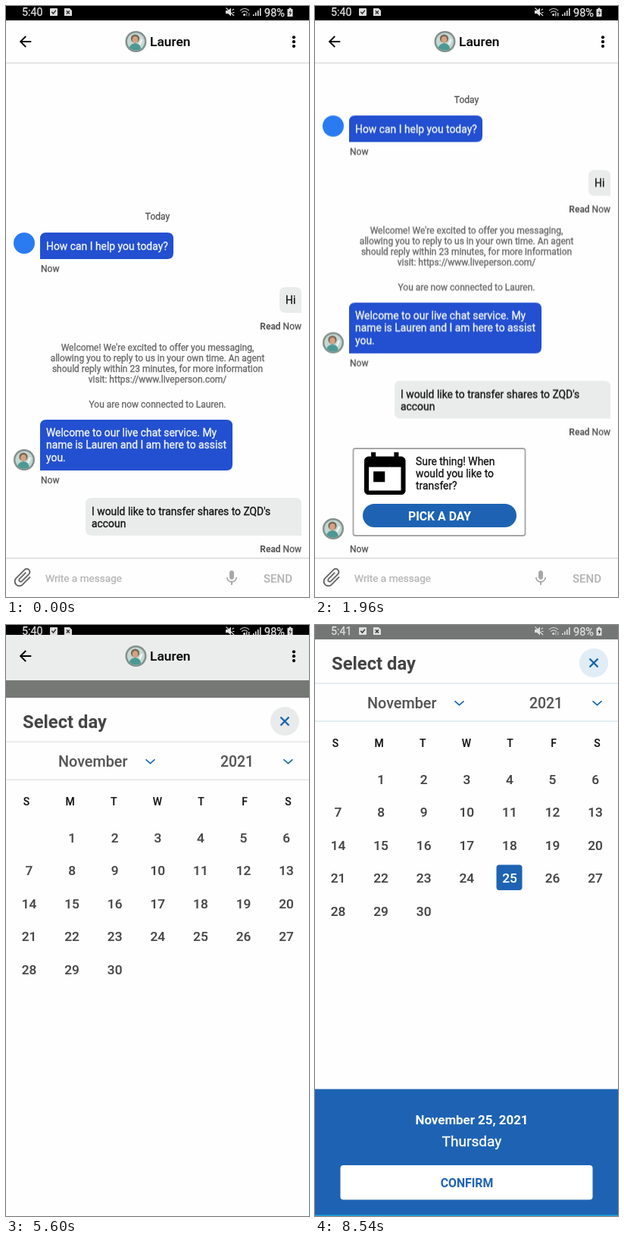
Animation of 400 by 780 pixels, one loop 9240 ms. Source, as an HTML page:

```html
<!DOCTYPE html>
<html lang="en">
<head>
<meta charset="utf-8">
<title>Chat and day picker</title>
<style>
html, body { margin: 0; width: 100%; height: 100%; overflow: hidden; background: #fff; }
svg { display: block; width: 400px; height: 780px; }
text { font-family: Roboto, sans-serif; font-size: 12px; fill: currentColor; stroke: currentColor; stroke-width: .3px; white-space: pre; }
.msg text { font-size: 13.9px; }
.mid { text-anchor: middle; }
.end { text-anchor: end; }
.b { font-weight: 700; stroke-width: 0; }
.m { font-weight: 500; stroke-width: .1px; }
.note { color: #666; }
.small { color: #555; }
.line { fill: none; stroke: #1565b0; stroke-width: 1.6; }

.a { animation: 9240ms linear infinite; }
.step { animation-timing-function: step-end; }
.cursor { animation-name: blink; }
.today { animation-name: today; }
.list { animation-name: list; }
.card { animation-name: card; }
.dim { animation-name: dim; }
.head { animation-name: head; }
.lift { animation-name: lift; }
.top { animation-name: top; }
.sheet { animation-name: sheet; }
.cool { animation-name: cool; }
.old { animation-name: old; }
.new { animation-name: new; }
.picked { animation-name: picked; }
.net { animation-name: net; }

@keyframes blink {
  0%, 6.05%, 18.93%, 29.53%, 40.9%, 52.26% { opacity: 0; }
  .75%, 12.87%, 24.23%, 35.59%, 46.2%, 58.32%, 100% { opacity: 1; }
}
@keyframes today {
  0% { transform: none; }
  15.52%, 100% { transform: translateY(-154px); }
}
@keyframes list {
  0%, 15.52% { transform: translateY(0); animation-timing-function: cubic-bezier(.37, 0, .63, 1); }
  18.4%, 100% { transform: translateY(-154.5px); }
}
@keyframes card { 0%, 18.4% { opacity: 0; } 19.91%, 100% { opacity: 1; } }
@keyframes dim { 0%, 58.33% { opacity: 0; } 60.6%, 100% { opacity: 1; } }
@keyframes head { 0% { opacity: 1; } 61.04%, 100% { opacity: 0; } }
@keyframes lift { 0%, 58.33% { transform: translateY(0); } 60.6%, 100% { transform: translateY(-6px); } }
@keyframes top { 0% { fill: #000; } 61.04%, 100% { fill: #737674; } }
@keyframes sheet {
  0%, 58.345% { transform: translateY(761px); animation-timing-function: cubic-bezier(.333, 1, .667, 1); }
  62.6%, 100% { transform: translateY(0); }
}
@keyframes cool { 0% { opacity: 0; } 62.1%, 100% { opacity: 1; } }
@keyframes old { 0% { opacity: 1; } 67.4%, 100% { opacity: 0; } }
@keyframes new { 0% { opacity: 0; } 67.4%, 100% { opacity: 1; } }
@keyframes picked { 0% { opacity: 0; } 80.29%, 100% { opacity: 1; } }
@keyframes net { 0%, 92.4% { opacity: .5; } 11.35%, 100% { opacity: .85; } }
</style>
</head>
<body>
<svg viewBox="0 0 400 780">
  <defs>
    <clipPath id="disc"><circle r="11.5"/></clipPath>
    <g id="avatar">
      <circle r="14" fill="#84908d"/>
      <circle r="11.5" fill="#c3d8d3"/>
      <g clip-path="url(#disc)">
        <path d="M-10 12Q-9 3 -1 2Q7 3 7 12Z" fill="#4c9993"/>
        <circle cx="-1" cy="-4" r="5.6" fill="#7b6655"/>
        <ellipse cx="-1" cy="-2.5" rx="3.7" ry="4.6" fill="#d5a283"/>
        <path d="M5 4L8 -3" stroke="#f4f6f5" stroke-width="2.4"/>
      </g>
    </g>
    <path id="chevron" d="M-6 -2.6L0 2.6L6 -2.6"/>
  </defs>

  <rect width="400" height="780" fill="#fefefe"/>

  <!-- conversation -->
  <text class="a step today mid small" x="200" y="281.5">Today</text>
  <g class="a list">
    <circle cx="24" cy="313" r="14" fill="#2a7bf2"/>
    <g fill="#2350d0">
      <path d="M53 299H213Q221 299 221 307V326Q221 334 213 334H45V307Q45 299 53 299Z"/>
      <path d="M53 546H291Q299 546 299 554V605Q299 613 291 613H45V554Q45 546 53 546Z"/>
    </g>
    <g fill="#eaecec">
      <path d="M369 371H382Q390 371 390 379V405H369Q361 405 361 397V379Q361 371 369 371Z"/>
      <path d="M113 649H382Q390 649 390 657V699H113Q105 699 105 691V657Q105 649 113 649Z"/>
    </g>
    <g class="msg" color="#f4f7ff">
      <text x="53" y="321.5">How can I help you today?</text>
      <text x="53" y="568">Welcome to our live chat service. My</text>
      <text x="53" y="584.3">name is Lauren and I am here to assist</text>
      <text x="53" y="600.6">you.</text>
    </g>
    <g class="msg" color="#111">
      <text x="369" y="392.5">Hi</text>
      <text x="113" y="671.5">I would like to transfer shares to ZQD's</text>
      <text x="113" y="687.8">accoun</text>
    </g>
    <g class="small">
      <text x="46" y="350.5">Now</text>
      <text x="46" y="629.5">Now</text>
      <text class="end" x="390" y="426.5"><tspan class="b">Read</tspan> Now</text>
      <text class="end" x="390" y="721.3"><tspan class="b">Read</tspan> Now</text>
    </g>
    <g class="note mid">
      <text x="200" y="454.8">Welcome! We're excited to offer you messaging,</text>
      <text x="200" y="469">allowing you to reply to us in your own time. An agent</text>
      <text x="200" y="483.2">should reply within 23 minutes, for more information</text>
      <text x="200" y="497.4">visit: https://www.liveperson.com/</text>
      <text x="200" y="529.8">You are now connected to Lauren.</text>
    </g>
    <use href="#avatar" x="24" y="599"/>
  </g>

  <g class="a card">
    <rect x="50.5" y="584" width="227" height="115" rx="3" fill="#fff" stroke="#a6a6a6" stroke-width="1.8"/>
    <path transform="translate(55.9 586.2) scale(3.03 2.8)" d="M19 3h-1V1h-2v2H8V1H6v2H5c-1.11 0-1.99.9-1.99 2L3 19c0 1.1.89 2 2 2h14c1.1 0 2-.9 2-2V5c0-1.1-.9-2-2-2zm0 16H5V8h14v11zM7 10h5v5H7z"/>
    <g class="msg" color="#111">
      <text x="133" y="606">Sure thing! When</text>
      <text x="133" y="622">would you like to</text>
      <text x="133" y="638">transfer?</text>
    </g>
    <rect x="63" y="657" width="203" height="31" rx="15.5" fill="#1e63b3"/>
    <text class="mid b" x="164.5" y="678.5" style="font-size:15.8px" color="#fff">PICK A DAY</text>
    <use href="#avatar" x="24" y="690"/>
    <text class="small" x="46" y="721.3">Now</text>
  </g>

  <!-- message bar -->
  <rect y="728" width="400" height="52" fill="#fefefe"/>
  <rect y="728" width="400" height="1.6" fill="#dcdcdc"/>
  <path transform="translate(22.5 754.5) rotate(45) scale(1.25) translate(-12.5 -12)" fill="#666" d="M16.5 6v11.5c0 2.21-1.79 4-4 4s-4-1.79-4-4V5c0-1.38 1.12-2.5 2.5-2.5s2.5 1.12 2.5 2.5v10.5c0 .55-.45 1-1 1s-1-.45-1-1V6H10v9.5c0 1.38 1.12 2.5 2.5 2.5s2.5-1.12 2.5-2.5V5c0-2.21-1.79-4-4-4S7 2.79 7 5v12.5c0 3.04 2.46 5.5 5.5 5.5s5.5-2.46 5.5-5.5V6h-1.5z"/>
  <g color="#b4b4b4">
    <text x="52" y="759.8" style="font-size:13.6px">Write a message</text>
    <text class="m" x="340" y="761.2" style="font-size:15px">SEND</text>
  </g>
  <path transform="translate(286 743)" fill="#a8a8a8" d="M12 14c1.66 0 2.99-1.34 2.99-3L15 5c0-1.66-1.34-3-3-3S9 3.34 9 5v6c0 1.66 1.34 3 3 3zm5.3-3c0 3-2.54 5.1-5.3 5.1S6.7 14 6.7 11H5c0 3.41 2.72 6.23 6 6.72V21h2v-3.28c3.28-.48 6-3.3 6-6.72h-1.7z"/>
  <rect class="a step cursor" x="51.5" y="745" width="2.5" height="20" fill="#2a9fc0"/>

  <rect class="a dim" y="73" width="400" height="707" fill="#000500" fill-opacity=".54"/>

  <!-- status bar -->
  <rect class="a step top" width="400" height="97" fill="#000"/>
  <g color="#dedede" fill="#dedede">
    <text class="a step old" x="21" y="13.4" style="font-size:14.2px">5:40</text>
    <text class="a step new" x="21" y="13.4" style="font-size:14.2px">5:41</text>
    <text x="341" y="13.6" style="font-size:14.5px">98%</text>
    <rect x="58" y="3" width="10" height="10" rx="1"/>
    <path d="M60.3 7.8L62.4 10L66 5.6" fill="none" stroke="#333" stroke-width="1.5"/>
    <path d="M77 3h7l3 3v7H77Z"/>
    <path d="M79.8 6.2L84 10.6M84 6.2L79.8 10.6" stroke="#333" stroke-width="1.4"/>
    <path d="M290 6h3l4 -3.5v11L293 10h-3Z"/>
    <path d="M290.5 2.5L301 13M298.5 5.5L301 4M299 8.5h2.5" stroke="#dedede" stroke-width="1.1"/>
    <path d="M309 6Q315 .8 321 6M311 8.6Q315 5 319 8.6" fill="none" stroke="#dedede" stroke-width="1.2" opacity=".8"/>
    <circle cx="314.6" cy="11.6" r="1.5"/>
    <path class="a step net" d="M317 13.5V9h1.5v4.5ZM320 13.5V9h1.5v4.5Z"/>
    <path d="M326 13v-2h1.6v2ZM329 13V8.5h1.6V13ZM332 13V6h1.6v7ZM335 13V3h1.6v10Z"/>
    <path d="M371.5 4h2V2.5h3V4h2v10h-7Z"/>
    <path d="M376 5l-2.6 4.2h1.8L374.3 13l2.9 -4.7h-1.9Z" fill="#222"/>
  </g>

  <!-- title bar -->
  <g class="a step head">
    <rect y="19" width="400" height="78" fill="#fefefe"/>
    <rect class="a dim" y="73" width="400" height="24" fill="#757875"/>
    <g class="a lift">
      <rect y="19" width="400" height="57" fill="#fefefe"/>
      <rect y="74.5" width="400" height="1.5" fill="#dedede"/>
      <rect class="a dim" y="19" width="400" height="60" fill="#ebedec"/>
      <path transform="translate(13.9 35.4) scale(.97)" d="M20 11H7.83l5.59-5.59L12 4l-8 8 8 8 1.41-1.41L7.83 13H20v-2z"/>
      <use href="#avatar" x="171.5" y="47"/>
      <text class="m" x="190" y="53.3" style="font-size:17.4px" color="#000">Lauren</text>
      <circle cx="380" cy="41.3" r="2.1"/>
      <circle cx="380" cy="47.2" r="2.1"/>
      <circle cx="380" cy="53.1" r="2.1"/>
    </g>
  </g>

  <!-- day picker -->
  <g class="a sheet">
    <rect y="19" width="400" height="761" fill="#fefefe"/>
    <g fill="#e4e6e6">
      <rect y="76.5" width="400" height="1.5"/><rect y="126.5" width="400" height="1.5"/>
      <circle cx="368" cy="50" r="19" fill="#e9ebeb"/>
    </g>
    <g class="a step cool" fill="#dfecf3">
      <rect y="76.5" width="400" height="1.5"/><rect y="126.5" width="400" height="1.5"/>
      <circle cx="368" cy="50" r="19" fill="#e1edf6"/>
    </g>
    <path class="line" d="M362.5 44.5L373.5 55.5M373.5 44.5L362.5 55.5" style="stroke-width:2.4"/>
    <text class="b" x="22" y="59.2" style="font-size:23.8px" color="#444">Select day</text>
    <g color="#555">
      <text class="m" x="69" y="110" style="font-size:19.8px">November</text>
      <text class="m" x="283" y="110" style="font-size:19.4px">2021</text>
    </g>
    <g class="line"><use href="#chevron" x="190.5" y="103"/><use href="#chevron" x="372.5" y="103"/></g>
    <g id="week" class="mid" color="#111"></g>
    <g id="days" class="mid" color="#444"></g>
  </g>

  <!-- chosen day -->
  <g class="a step picked">
    <rect x="239.5" y="316.5" width="34" height="33.5" rx="4" fill="#1e63b3"/>
    <rect y="612.5" width="400" height="167.5" fill="#1e63b3"/>
    <rect y="778.5" width="400" height="1.5" fill="#1ca5d8"/>
    <rect x="33.5" y="713" width="333" height="45.5" rx="4" fill="#fff"/>
    <g class="mid" color="#fff">
      <text class="m" x="257" y="340.1" style="font-size:17.3px">25</text>
      <text class="b" x="207" y="659.4" style="font-size:16.9px">November 25, 2021</text>
      <text x="207" y="688" style="font-size:19.1px">Thursday</text>
      <text class="b" x="200.5" y="741.6" style="font-size:15.8px" color="#1e63b3">CONFIRM</text>
    </g>
  </g>
</svg>
<script>
const label = (id, x, y, size, str) => {
  const el = document.createElementNS('http://www.w3.org/2000/svg', 'text');
  el.setAttribute('x', x);
  el.setAttribute('y', y);
  el.setAttribute('class', 'm');
  el.style.fontSize = size + 'px';
  el.textContent = str;
  document.getElementById(id).append(el);
};
[...'SMTWTFS'].forEach((c, i) => label('week', 27 + i * 57.6, 161, 14, c));
for (let d = 1; d <= 30; d++)
  label('days', 30.5 + d % 7 * 56.6, 209.7 + Math.floor(d / 7) * 43.45, 17.3, d);
</script>
</body>
</html>
```
